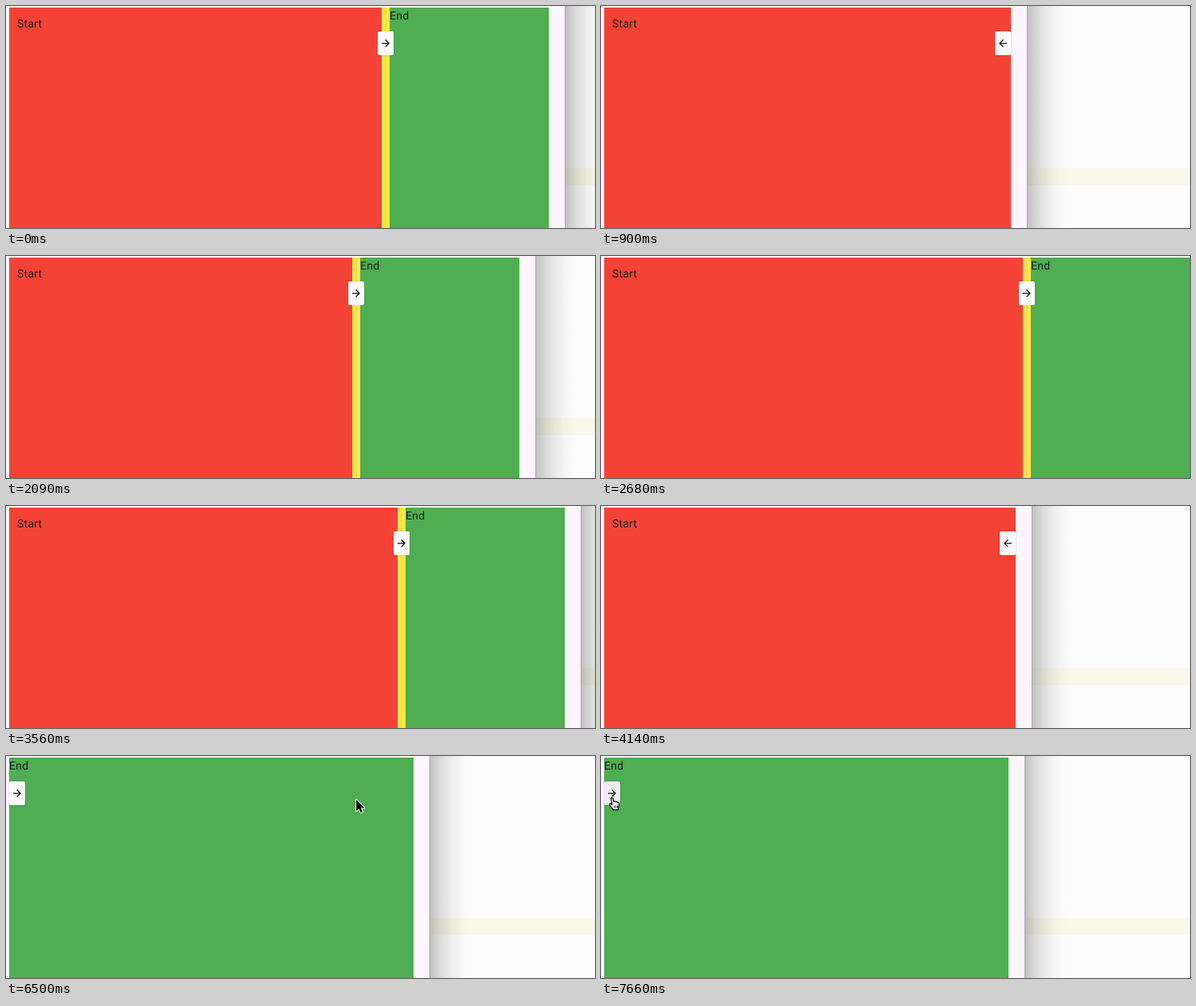
An HTML page with a canvas for the animation above (8 s loop, 740 by 280 pixels).

```html
<!DOCTYPE html>
<html lang="en">
<head>
<meta charset="utf-8">
<title>Resizable split pane</title>
<style>
  html, body { margin: 0; width: 100%; height: 100%; overflow: hidden; }
  canvas { display: block; }
</style>
</head>
<body>
<canvas id="stage" width="740" height="280"></canvas>
<script>
const ctx = document.getElementById('stage').getContext('2d');
const LOOP = 8000, STEP = 147.3;        // the picture advances in steps
const LEFT = 4, TOP = 2, MARGIN = 20;   // pane insets inside the window
const END_W = 200, DIVIDER = 10, BREAKPOINT = 645;
const CURSOR_IN = 35, CLICK = 41;

// Drags of the window edge, timed in steps.
const drags = [
  { from: 0, span: 8.53, by: -212 },
  { from: 11, span: 5, by: 270 },
  { from: 19, span: 2, by: -33 },
  { from: 23.5, span: 5.15, by: -195 }
];

const arrowIcon = new Path2D('M12 4l-1.41 1.41L16.17 11H4v2h12.17l-5.58 5.59L12 20l8-8z');
const hand = new Path2D('M3.6 1.8C3.6.2 5.8.2 6.1 1.6L7 5.6C7.6 4.6 9 4.8 9.2 6C10 5.2 11.2 5.6 ' +
  '11.4 6.7C12.4 6.1 13.7 6.7 13.8 8C14 10 13.5 11 12.8 12.6L12.6 15.8H6C5 13.5 3.6 12 2 9.8' +
  'C1 8.6 2 7.4 3.2 8.2L4.9 9.6Z');
const fingers = new Path2D('M7.6 10.5l.2 3M9.6 10.5l.1 3M11.5 10.4v3');
const pointer = new Path2D('M0 0V14.5L3.4 11.3L5.7 16.4L8 15.4L5.8 10.4H10.3Z');

function ease(n, from, span) {
  const u = Math.min(Math.max((n - from) / span, 0), 1);
  return u * u * (3 - 2 * u);
}

function windowEdge(n) {
  return Math.round(drags.reduce((x, d) => x + d.by * ease(n, d.from, d.span), 702));
}

// Rises onto the button, then swings in an arc to the far side.
function cursorAt(n) {
  const rise = ease(n, CURSOR_IN, 4), swing = ease(n, 42, 9.2);
  return {
    x: Math.round(495 - 486 * swing),
    y: Math.round(66 - 28 * rise + 14 * swing + 38 * Math.sin(Math.PI * swing))
  };
}

function rect(color, x, y, w, h) {
  ctx.fillStyle = color;
  ctx.fillRect(x, y, w, h);
}

function label(text, x, y) {
  ctx.fillStyle = '#1d1b20';
  ctx.fillText(text, x, y);
}

function backdrop(edge) {
  rect('#fcfcfc', 0, 0, 740, 280);
  rect('#faf8ea', 0, 204, 740, 22);
  const shade = ctx.createLinearGradient(edge, 0, edge + 56, 0);
  for (let u = 0; u <= 1; u += .125) {
    shade.addColorStop(u, `rgba(0,0,0,${.24 * (1 - u) ** 2})`);
  }
  rect(shade, edge, 0, 56, 280);
  rect('#fdf6fe', 0, 0, edge, 280);
  rect('#aaa6ab', edge, 0, 1, 280);
}

function button(x, dir, color) {
  ctx.save();
  ctx.shadowColor = 'rgba(0,0,0,.2)';
  ctx.shadowBlur = 2;
  ctx.fillStyle = color;
  ctx.beginPath();
  ctx.roundRect(x, 32, 20, 30, 2);
  ctx.fill();
  ctx.shadowColor = 'transparent';
  ctx.translate(x + 10, 47);
  ctx.scale(dir * .625, .625);
  ctx.translate(-12, -12);
  ctx.fillStyle = '#111';
  ctx.fill(arrowIcon);
  ctx.restore();
}

function cursor(x, y, over) {
  ctx.save();
  ctx.lineJoin = 'round';
  if (over) {
    ctx.translate(x, y);
    ctx.fillStyle = '#fff';
    ctx.strokeStyle = '#000';
    ctx.lineWidth = 1.2;
    ctx.fill(hand);
    ctx.stroke(hand);
    ctx.lineWidth = .9;
    ctx.stroke(fingers);
  } else {
    ctx.translate(x + 4, y + 1);
    ctx.strokeStyle = '#fff';
    ctx.lineWidth = 2;
    ctx.stroke(pointer);
    ctx.fillStyle = '#000';
    ctx.fill(pointer);
  }
  ctx.restore();
}

function draw(time) {
  const n = Math.floor(time % LOOP / STEP);
  const edge = windowEdge(n), right = edge - MARGIN;
  const split = edge >= BREAKPOINT, endOnly = n >= CLICK;
  const endX = endOnly ? LEFT : split ? right - END_W : right;
  const buttonX = endOnly ? LEFT : split ? endX - 15 : right - 20;

  backdrop(edge);
  if (!endOnly) {
    rect('#f44336', LEFT, TOP, endX - LEFT, 280);
    label('Start', 14, 26.8);
  }
  if (split) {
    rect('#ffeb3b', endX - DIVIDER, TOP, DIVIDER, 280);
    rect('#cac4d0', endX - DIVIDER / 2 - .5, TOP, 1, 280);
  }
  if (split || endOnly) {
    rect('#4eae51', endX, TOP, right - endX, 280);
    label('End', endX, 16.8);
  }

  const { x, y } = cursorAt(n);
  const shown = n >= CURSOR_IN;
  const over = shown && x + 5 >= buttonX && x + 5 <= buttonX + 20 && y >= 31 && y <= 60;
  const color = !over ? '#fefbff' : n === CLICK - 1 ? '#e4e0e5' : '#f0ecf2';
  button(buttonX, split || endOnly ? 1 : -1, color);
  if (shown) cursor(x, y, over);
}

ctx.font = '14px Roboto, sans-serif';
ctx.letterSpacing = '0.25px';
ctx.textRendering = 'geometricPrecision';
const start = performance.now();
(function tick() {
  draw(performance.now() - start);
  requestAnimationFrame(tick);
})();
</script>
</body>
</html>
```
